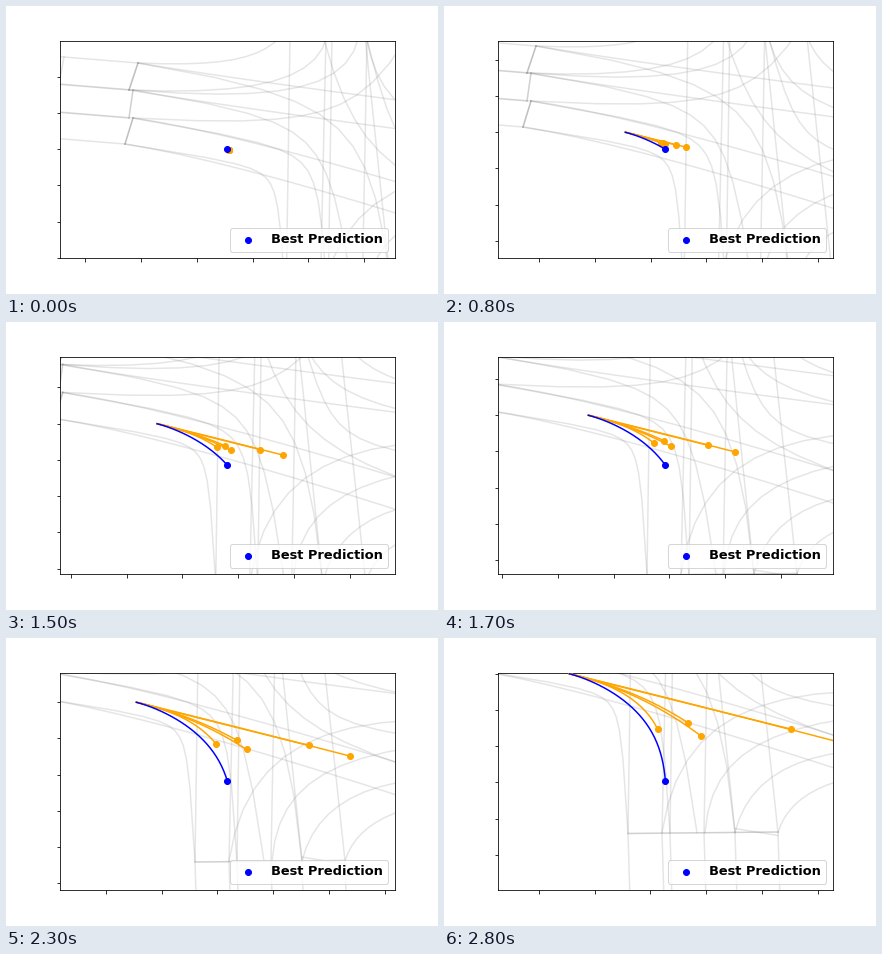
These frames come from a looping animation (432x288 px, 2900 ms). A matplotlib script:

```python
import numpy as np
import matplotlib.pyplot as plt
from matplotlib.animation import FuncAnimation

FRAMES, INTERVAL = 29, 100
CX, CY = 221.4, 143.28          # start of the drive, in stage pixels
HALF_W, HALF_H = 167.4, 108.72  # half the size of the view
TICK_X, TICK_Y = 55.8, 36.24    # tick spacing
STEPS = np.arange(FRAMES)

# Corners where the western lanes meet the junction
A, B, B2, C, C2, D = (132, 57), (123, 84), (127, 84), (127, 112), (123, 112), (119, 138)
TOP, BOTTOM, EAST, STOP = 30, 370, 500, 302


def bend(start, corner, end, weight=1.0, parts=10):
    """Conic arc that hugs its corner more tightly as the weight grows."""
    t = np.linspace(0, 1, parts + 1)[:, None]
    w0, w1, w2 = (1 - t) ** 2, 2 * weight * t * (1 - t), t ** 2
    total = w0 + w1 + w2
    return (w0 * np.array(start) + w1 * np.array(corner) + w2 * np.array(end)) / total


def build_roads():
    roads = []
    # Western lanes: every boundary runs back at the same slope
    for x, y in (A, B, B2, C, C2, D):
        roads.append([(x, y), (x - 74, y - 6), (x - 90, y - 7)])
    roads.append([(58, 51), (53, 79)])

    # North-south boundaries, bending slightly at the southern stop line
    for top, stop in ((284, 280), (320, 314), (326, 322),
                      (361, 356), (359, 387), (401, 430)):
        roads.append([(top, TOP), (stop, STOP), (stop + 2, BOTTOM)])

    # From the west: right turns, left turns and straight on
    roads += [
        bend(A, (367, 96), (387, STOP), 2.1),
        bend(B2, (323, 116), (349, STOP), 2.7),
        bend(C, (313, 144), (322, STOP), 4),
        bend(D, (272, 162), (280, STOP), 5),
        bend(A, (247, 62), (275, TOP), 1.2),
        bend(B, (307, 92), (321, TOP), 1.1),
        bend(B2, (338, 101), (353, TOP), 1.2),
        bend(C, (345, 124), (402, TOP), 1.8),
        bend(A, (250, 76.5), (EAST, 108)),
        bend(B, (250, 105), (EAST, 137)),
        bend(C, (240, 128), (EAST, 209)),
        bend(D, (240, 157), (EAST, 242)),
    ]
    # From the north and the south to the east
    roads += [
        bend((317, TOP), (352, 162), (EAST, 210), 1.6),
        bend((360, TOP), (392, 160), (EAST, 178), 2.3),
        bend((360, TOP), (375, 114), (EAST, 137), 1.4),
        bend((399, TOP), (408, 92), (EAST, 109), 1.1),
        bend((314, STOP), (334, 168), (EAST, 161), 1.1),
        bend((357, STOP), (364, 208), (EAST, 188), 1.15),
        bend((387, STOP), (404, 232), (EAST, 221)),
        bend((430, STOP), (442, 262), (EAST, 248)),
    ]
    # Stop lines are shared by several lanes, so they overlap
    roads += 3 * [[A, B], [C, D]] + 2 * [[B2, C2], [(280, 303), (430, 301.5)]]
    roads.append([(387, 298), (430, 305)])
    return roads


def through(values, times=(8, 17, 23, 28)):
    """Smooth motion from zero through a value at each key time."""
    times = np.array(times)
    speed = np.polyfit(times, np.array(values) / times, len(times) - 1)
    return STEPS * np.polyval(speed, STEPS)


def guess(vx, ax_, vy, ay):
    """Path with a starting speed and a steady change of speed."""
    t = np.maximum(STEPS, 0.3)
    return np.column_stack([vx * t + ax_ * t ** 2, vy * t + ay * t ** 2])


driven = np.column_stack([through([40, 77, 91, 96]),
                          through([17, 50, 79, 107.5])])
guesses = [
    guess(4.90, -0.0625, 1.06, 0.0328),
    guess(4.82, -0.0203, 1.12, 0.0228),
    guess(5.13, -0.0148, 1.22, 0.0362),
    guess(5.70, 0.0785, 1.44, 0.0190),
    guess(6.72, 0.1125, 1.62, 0.0315),
]

fig = plt.figure(figsize=(6, 4), dpi=72)
ax = fig.add_axes([0.125, 0.125, 0.775, 0.755])

for road in build_roads():
    ax.plot(*zip(*road), color="gray", alpha=0.2, lw=1.5, zorder=1)


def add_track(path, color, z, label=None):
    line, = ax.plot([], [], color=color, lw=1.5, zorder=z)
    dot = ax.scatter([CX], [CY], color=color, zorder=z + 1, label=label)
    return path, line, dot


tracks = [add_track(path, "orange", 3) for path in guesses]
tracks.append(add_track(driven, "blue", 5, "Best Prediction"))

ax.legend(loc="lower right",
          prop={"family": "DejaVu Sans", "weight": "bold", "size": 13}
          ).set_zorder(10)
ax.set_xticks(79.2 + TICK_X * np.arange(-2, 10))
ax.set_yticks(143.1 + TICK_Y * np.arange(-4, 8))
ax.tick_params(labelbottom=False, labelleft=False)


def update(i):
    for path, line, dot in tracks:
        pts = np.vstack([[0, 0], path[:i + 1]]) + (CX, CY)
        line.set_data(pts[:, 0], pts[:, 1])
        dot.set_offsets(pts[-1:])
    # The view follows the end of the driven path
    x, y = driven[i] + (CX, CY)
    ax.set_xlim(x - HALF_W, x + HALF_W)
    ax.set_ylim(y + HALF_H, y - HALF_H)
    return []


anim = FuncAnimation(fig, update, frames=FRAMES, interval=INTERVAL,
                     init_func=lambda: update(0), repeat=True)
plt.show()
```
